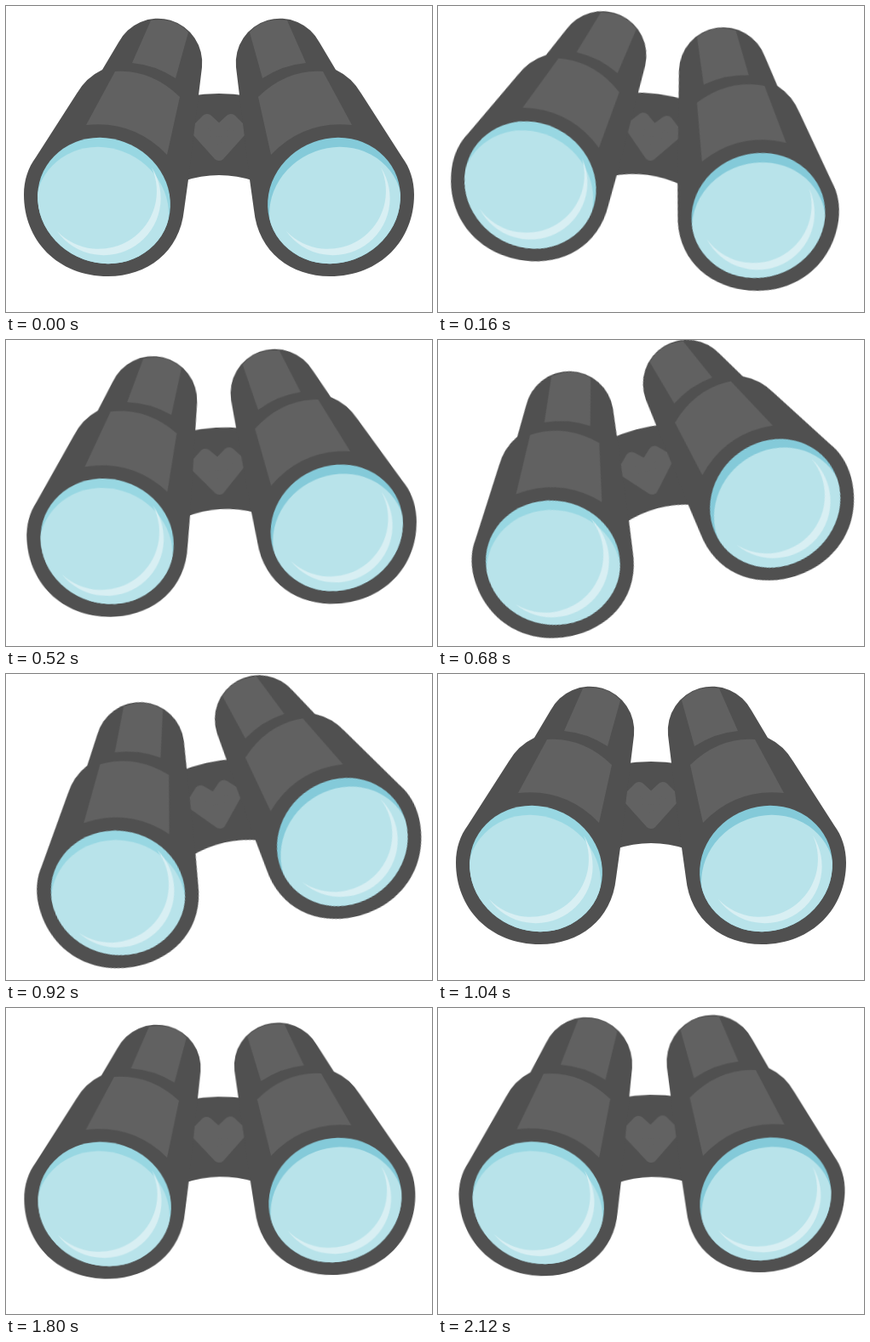
Write an HTML page that moves like this. It is 500 px wide and 360 px high and loops after 2400 ms.

```html
<!DOCTYPE html>
<html lang="en">
<head>
<meta charset="utf-8">
<title>Binoculars</title>
<style>
  html, body { margin: 0; width: 100%; height: 100%; overflow: hidden; background: #fff; }
  svg { display: block; width: 500px; height: 360px; overflow: visible; transform-origin: 250px 170px; }
</style>
</head>
<body>
<svg id="binoculars" viewBox="0 0 500 360">
  <defs>
    <ellipse id="rim" cx="115" cy="229" rx="79" ry="73" transform="rotate(26 115 229)"/>
    <clipPath id="glass"><use href="#rim"/></clipPath>
    <g id="barrel">
      <path fill="#505050" d="M21 222C21 205 26 190 35 178L83 103Q94 84 113 75L132 43A52 52 0 0 1 230 72L214 204L209 240C204 290 165 318 120 318C60 318 21 275 21 222Z"/>
      <g fill="#616161">
        <path d="M148 67L170 17Q198 13 214 31L199 85Q174 69 148 67Z"/>
        <path d="M128 77Q170 74 204 107L189 175Q150 134 94 140Z"/>
      </g>
      <use href="#rim"/>
      <g clip-path="url(#glass)">
        <use href="#rim" x="-2" y="11" fill="#b8e3ea"/>
      </g>
    </g>
    <path id="shine" fill="#d8eff3" d="M171 190A67 67 0 0 1 60 265A68 68 0 0 0 171 190Z"/>
  </defs>
  <path fill="#505050" d="M215 106Q250 100 285 106L292 206Q250 192 208 206Z"/>
  <path fill="#626262" stroke="#626262" stroke-width="14" stroke-linejoin="round"
        d="M250 175L224 146L236 134L250 147L264 134L276 146Z"/>
  <use href="#barrel" fill="#98d7e2"/>
  <use href="#barrel" fill="#84cad9" transform="matrix(-1 0 0 1 500 0)"/>
  <use href="#shine"/>
  <use href="#shine" x="269"/>
</svg>
<script>
  const LOOP = 2400, STEP = 40;
  const art = document.getElementById('binoculars');
  const start = performance.now();

  // Smooth rise from 0 to 1 between two times
  function ease(t, from, to) {
    const u = Math.min(1, Math.max(0, (t - from) / (to - from)));
    return (1 - Math.cos(Math.PI * u)) / 2;
  }

  function draw() {
    const t = Math.floor((performance.now() - start) % LOOP / STEP) * STEP;
    const back = ease(t, 1040, 1500);
    const forth = ease(t, 1500, 2120);
    const turn = 14.5 * ease(t, 0, 310) - 29.5 * ease(t, 310, 680) + 15 * ease(t, 880, 1040) - back;
    const depth = 0.00028 * back - 0.0005 * forth;
    const scale = 1 - 0.032 * back + 0.03 * forth;
    art.style.transform =
      `matrix3d(1,0,0,0, 0,${scale},0,${-depth}, 0,0,1,0, 0,0,0,1) rotate(${turn}deg)`;
    requestAnimationFrame(draw);
  }
  draw();
</script>
</body>
</html>
```
